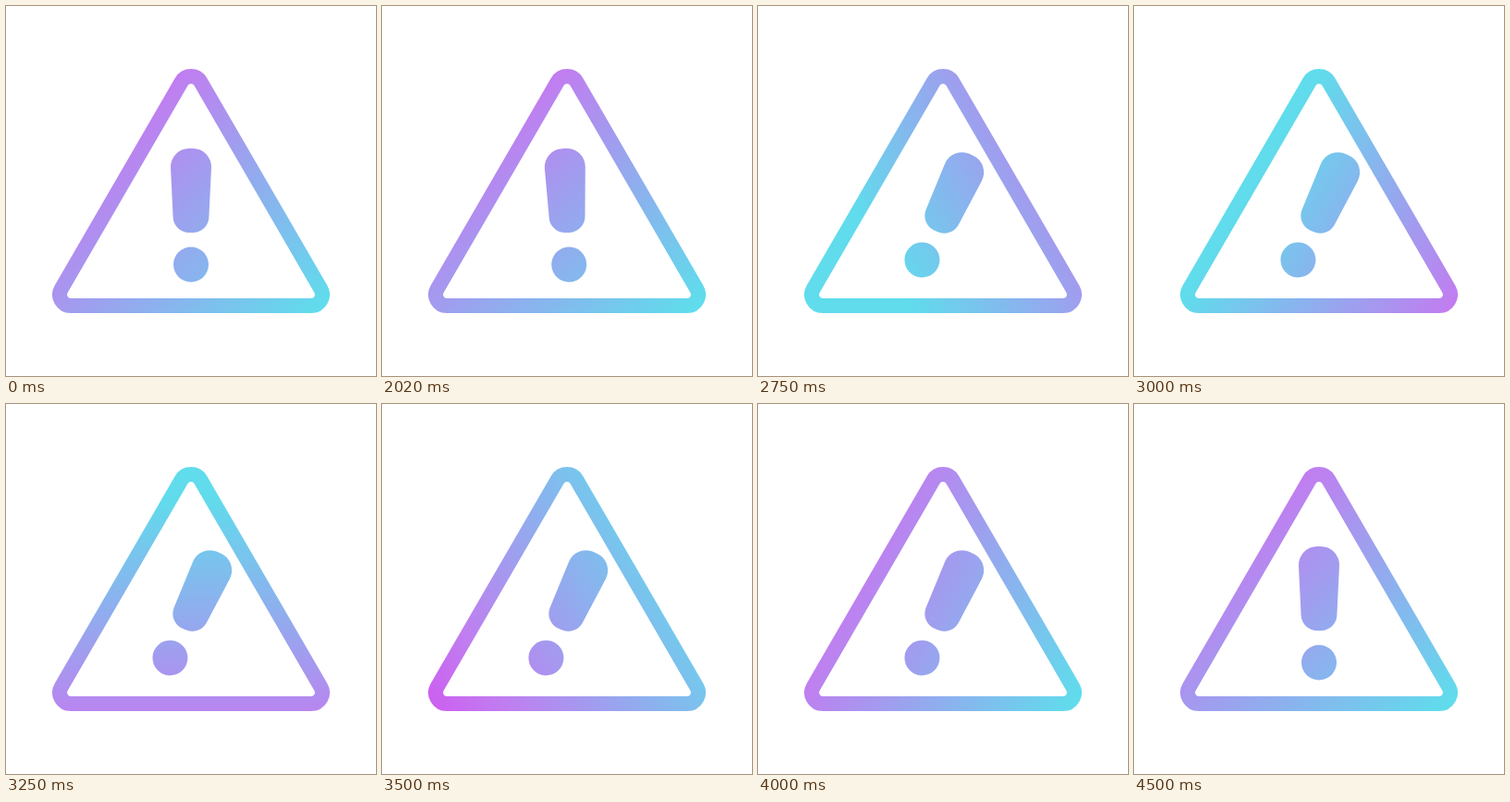
An HTML page with a canvas for the animation above (4520 ms loop, 400x400 px).

```html
<!DOCTYPE html>
<html>
<head>
<meta charset="utf-8">
<style>
  html, body { margin: 0; width: 100%; height: 100%; overflow: hidden; background: #fff; }
  canvas { display: block; width: 400px; height: 400px; }
</style>
</head>
<body>
<canvas id="stage" width="400" height="400"></canvas>
<script>
const ctx = document.getElementById('stage').getContext('2d');
const LOOP = 4520, REST = 1995, STEP = 25, STEPS = 100;
const PIVOT = 226.5, SWING = 30;

// Swing keys: [step, degrees]
const swings = [[0, 0], [5, -SWING], [9, SWING]];
for (let i = 0; i < 15; i++) swings.push([14 + 5 * i, i % 2 ? SWING : -SWING]);
swings.push([90, 0], [STEPS, 0]);

// Gradient keys: [step, direction in degrees, start and end distance from the centre]
const sweeps = [
  [0, 44, -94, 187],
  [20, 90, -128, 122],
  [40, 211, -184, 65],
  [60, 330, -120, 134],
  [80, 386, -88, 181],
  [100, 404, -94, 187]
];

const linear = x => x;
const easeInOut = x => x < .5 ? 2 * x * x : 1 - 2 * (1 - x) ** 2;

function sample(keys, step, ease) {
  const i = Math.max(1, keys.findIndex(key => key[0] >= step));
  const [a, b] = [keys[i - 1], keys[i]];
  const p = ease((step - a[0]) / (b[0] - a[0]));
  return a.slice(1).map((v, j) => v + (b[j + 1] - v) * p);
}

const radians = degrees => degrees * Math.PI / 180;

function makeGradient([angle, from, to]) {
  const dx = Math.cos(radians(angle)), dy = Math.sin(radians(angle));
  const start = from - (to - from) / 4;
  const g = ctx.createLinearGradient(200 + dx * start, 200 + dy * start, 200 + dx * to, 200 + dy * to);
  g.addColorStop(0, '#cb62f0');
  g.addColorStop(.2, '#c07ef0');
  g.addColorStop(1, '#60dcec');
  return g;
}

// Closed polygon with rounded corners: [x, y, radius]
function rounded(corners) {
  const path = new Path2D(), [a, b] = corners;
  path.moveTo((a[0] + b[0]) / 2, (a[1] + b[1]) / 2);
  for (let i = 1; i <= corners.length; i++) {
    const [x, y, r] = corners[i % corners.length], next = corners[(i + 1) % corners.length];
    path.arcTo(x, y, next[0], next[1], r);
  }
  path.closePath();
  return path;
}

const triangle = rounded([[200, 64, 12], [350.8, 324, 12], [49.2, 324, 12]]);
const mark = new DOMMatrix();
const bar = rounded([[177, 154, 20], [223, 154, 20], [218.6, 245, 17.5], [181.4, 245, 17.5]]);
const dot = new Path2D();
dot.arc(200, 279.5, 19, 0, 7);

function draw() {
  const t = performance.now() % LOOP;
  const step = Math.min(STEPS, Math.max(0, Math.floor((t - REST) / STEP)));
  const [angle] = sample(swings, step, easeInOut);

  ctx.fillStyle = '#fff';
  ctx.fillRect(0, 0, 400, 400);
  ctx.fillStyle = ctx.strokeStyle = makeGradient(sample(sweeps, step, linear));
  ctx.lineWidth = 16;
  ctx.stroke(triangle);

  // Turn the paths only, so the gradient stays fixed to the stage
  const turned = new Path2D();
  const turn = mark.translate(200, PIVOT).rotate(angle).translate(-200, -PIVOT);
  turned.addPath(bar, turn);
  turned.addPath(dot, turn);
  ctx.fill(turned);
  requestAnimationFrame(draw);
}
draw();
</script>
</body>
</html>
```
